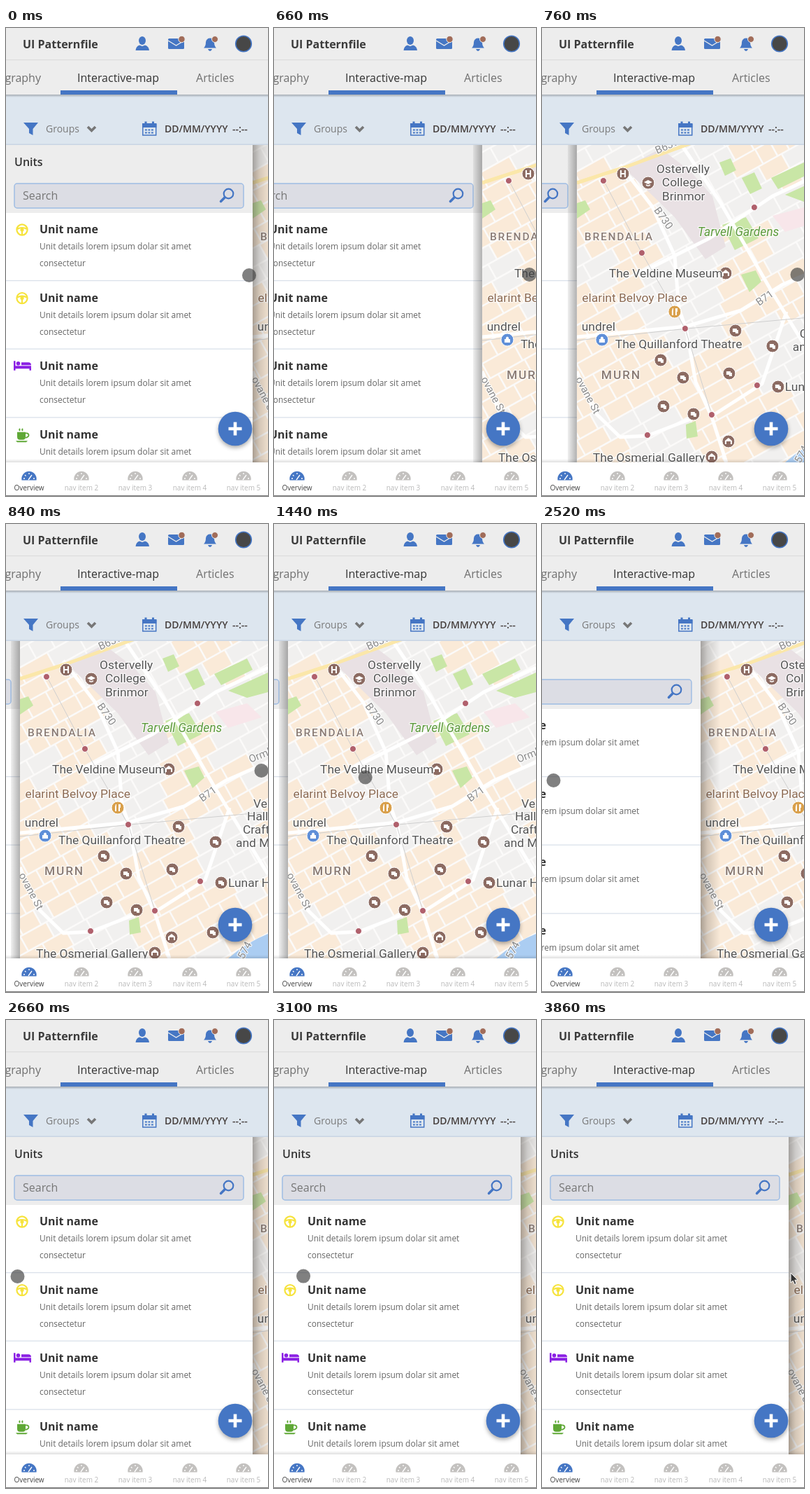
These frames come from a looping animation (375 by 668 pixels, 3.88 s). An HTML page:

```html
<!DOCTYPE html>
<html lang="en">
<head>
<meta charset="utf-8">
<title>Sliding panel over a map</title>
<style>
html, body { margin: 0; width: 100%; height: 100%; overflow: hidden; background: #fff }
svg { display: block; width: 375px; height: 668px; font: 16px "Open Sans", sans-serif; fill: #333 }
.semi { font-weight: 600 }
.bold { font-weight: 700 }
.small { font-size: 12px; fill: #666 }
.nav { font-size: 10px; text-anchor: middle }
.blue { fill: #4576c4 }
.line { fill: none; stroke: #4576c4 }
.map { font: 17.4px Roboto, sans-serif; fill: #555 }
.map text { paint-order: stroke; stroke: #fff; stroke-width: 2.5px; stroke-opacity: .8; stroke-linejoin: round }
.area { font-weight: 500; letter-spacing: 1.8px; fill: #8a7b74 }
.road { font-size: 15px; fill: #8b8b8b }
.street { fill: none; stroke: #fff; stroke-width: 5; stroke-linejoin: round }
.park { fill: #c9e6a6 }
</style>
</head>
<body>
<svg viewBox="0 0 375 668">
  <defs>
    <clipPath id="stage"><path d="M0 167H375V620H0Z"/></clipPath>
    <clipPath id="land"><path d="M20 167H730V620H20Z"/></clipPath>
    <linearGradient id="overMap">
      <stop stop-color="#3a3530" stop-opacity=".42"/>
      <stop offset=".35" stop-color="#3a3530" stop-opacity=".2"/>
      <stop offset="1" stop-color="#3a3530" stop-opacity="0"/>
    </linearGradient>
    <linearGradient id="overPanel">
      <stop stop-color="#444" stop-opacity=".08"/>
      <stop offset="1" stop-color="#444" stop-opacity=".42"/>
    </linearGradient>
    <linearGradient id="down" x2="0" y2="1">
      <stop stop-color="#000" stop-opacity=".25"/>
      <stop offset="1" stop-color="#000" stop-opacity="0"/>
    </linearGradient>
    <filter id="soft" x="-30%" y="-30%" width="160%" height="160%"><feGaussianBlur stdDeviation="3"/></filter>
  </defs>

  <g clip-path="url(#stage)">
    <g id="map" class="map">
      <g clip-path="url(#land)">
        <path fill="#fbfaf9" d="M20 167H400V620H20Z"/>
        <g id="blocks" transform="rotate(-29 200 390)"></g>
        <path fill="#e9e1e4" d="M88 200L140 172 182 204 214 240 233 312 204 330 160 270Z"/>
        <path fill="#f8e6ea" d="M300 268L345 256 366 276 318 291Z"/>
        <g class="park">
          <path d="M228 281L262 270 280 300 246 317Z"/>
          <path d="M224 192L240 186 248 203 232 211Z"/>
          <path d="M256 214L274 206 285 229 268 237Z"/>
          <path d="M298 214L345 192 353 208 308 230Z"/>
          <path d="M318 238L375 212V240L345 248Z"/>
          <path d="M20 250L32 246 39 259 20 272Z"/>
          <path d="M255 352L276 346 284 362 267 377Z"/>
          <path d="M176 566L190 561 193 583 177 586Z"/>
        </g>
        <path fill="#abcdf2" d="M318 620Q346 596 375 585V620Z"/>
        <g class="street">
          <path d="M82 195L128 255 160 325 166 400 177 432 190 505 213 555 234 620"/>
          <path d="M20 441L176 426 255 403 315 366 375 340"/>
          <path d="M170 167L226 250 300 378 375 500"/>
          <path d="M110 350L210 300 300 240 375 205"/>
          <path d="M20 490L45 548 82 584 121 582 186 557"/>
          <path d="M213 554L285 508 320 405"/>
          <path stroke="#fbe7a9" d="M20 221L88 199 190 162"/>
          <path stroke="#cfcfcf" stroke-width="1" d="M20 446L178 429 375 411M58 217L113 321 175 429 213 552"/>
        </g>
        <g id="pins"></g>
        <g>
          <text x="134" y="207">Ostervelly</text>
          <text x="142" y="226">College</text>
          <text x="142" y="246">Brinmor</text>
          <text x="193" y="297" font-style="italic" style="fill:#5c9a3c">Tarvell Gardens</text>
          <text x="66" y="356">The Veldine Museum</text>
          <text x="178" y="391" text-anchor="end" style="fill:#8c6a52">elarint Belvoy Place</text>
          <text x="75" y="432" text-anchor="end">undrel</text>
          <text x="75" y="457">The Quillanford Theatre</text>
          <text x="43" y="619">The Osmerial Gallery</text>
          <text x="318" y="518">Lunar Hall</text>
          <text x="354" y="405">Vel</text>
          <text x="345" y="423">Hall</text>
          <text x="339" y="442">Craft</text>
          <text x="329" y="461">and Mill</text>
          <text class="area" x="31" y="303" font-size="15.5">BRENDALIA</text>
          <text class="area" x="55" y="501">MURN</text>
        </g>
        <g class="road">
          <text transform="translate(130 260) rotate(55)">B730</text>
          <text transform="translate(281 397) rotate(-35)">B71</text>
          <text transform="translate(135 180) rotate(-24)">B639</text>
          <text transform="translate(18 501) rotate(62)">ovane St</text>
          <text transform="translate(350 341) rotate(-22)">Ormley</text>
          <text transform="translate(340 622) rotate(-62)">574</text>
        </g>
      </g>
      <path id="mapShade" fill="url(#overMap)" d="M20 167H48V620H20Z"/>
    </g>

    <g id="panel">
      <path fill="#ededed" d="M0 167H353V264H0Z"/>
      <path fill="#fff" d="M0 264H353V620H0Z"/>
      <text class="semi" x="12" y="197">Units</text>
      <rect x="12" y="222" width="328" height="35" rx="4" fill="#dcdde4" stroke="#9fbde4" stroke-width="1.5"/>
      <text x="24" y="245" fill="#777">Search</text>
      <g class="line" stroke-width="2.2">
        <circle cx="318.500" cy="236.500" r="6.800"/>
        <path stroke-width="3.500" stroke-linecap="round" d="M313 242L307.500 247.500"/>
      </g>
      <g id="rows"></g>
      <path id="panelShade" fill="url(#overPanel)" d="M340 167H353V620H340Z"/>
    </g>
  </g>

  <path fill="#ededed" d="M0 0H375V95H0Z"/>
  <path fill="#dbdbdb" d="M0 45H375V46H0Z"/>
  <path fill="#dde6ef" d="M0 95H375V166H0Z"/>
  <path fill="url(#down)" d="M0 95H375V99H0Z"/>
  <path fill="#c9d5e3" d="M0 165.500H375V167H0Z"/>
  <text class="bold" x="24" y="29" fill="#3b3b3b">UI Patternfile</text>
  <g class="blue">
    <ellipse cx="195" cy="18" rx="5" ry="6"/>
    <path d="M185.500 32Q186 26 191 24.500L195 26 199 24.500Q204.500 26 205 32Z"/>
    <rect x="232" y="15" width="23" height="15" rx="1.500"/>
    <path d="M283 28.500Q286 26 286 20Q287 14.500 292 14.500T298 20Q298 26 301 28.500ZM289 30H295Q294 33 292 33T289 30Z"/>
    <path d="M78 89H245V95H78Z"/>
    <path d="M25 135H46L38.500 144V153L33 150V144Z"/>
    <path d="M195 136H215.500V142H195ZM198.500 133.500H201.500V138H198.500ZM209 133.500H212V138H209Z"/>
  </g>
  <path fill="none" stroke="#ededed" stroke-width="1.400" d="M232 18L243.500 25 255 18"/>
  <path class="line" stroke-width="1.500" d="M195.800 137V153H214.700V137"/>
  <path class="line" stroke-width="2.200" stroke-dasharray="2.800 1.700" d="M199 145.500H212M199 149.500H212"/>
  <g fill="#a16c59" stroke="#ededed"><circle cx="251.500" cy="16" r="4.700"/><circle cx="299" cy="16" r="4.500"/></g>
  <circle cx="340" cy="22.500" r="11.300" fill="#474747" stroke="#4576c4" stroke-width="1.600"/>
  <g fill="#707070">
    <text x="50" y="77" text-anchor="end">Typography</text>
    <text x="102" y="77" fill="#333">Interactive-map</text>
    <text x="272" y="77">Articles</text>
    <text x="57" y="149" font-size="14" fill="#7a7a7a">Groups</text>
  </g>
  <path fill="none" stroke="#777" stroke-width="3.600" d="M117 141L122.500 146.500 128 141"/>
  <text class="semi" x="227" y="149" font-size="14" fill="#463f3d">DD/MM/YYYY<tspan x="324">--:--</tspan></text>

  <circle cx="328" cy="575" r="24" fill="#000" opacity=".35" filter="url(#soft)"/>
  <circle class="blue" cx="328" cy="572" r="24.300"/>
  <path stroke="#fff" stroke-width="4.600" d="M318.500 572H337.500M328 562.500V581.500"/>

  <path fill="url(#down)" opacity=".5" transform="matrix(1 0 0 -1 0 1236)" d="M0 616H375V621H0Z"/>
  <path fill="#fff" d="M0 620H375V668H0Z"/>
  <path fill="#777" d="M0 667H375V668H0Z"/>
  <g id="nav"></g>

  <circle id="touch" r="10" fill="#3c3c3c" fill-opacity=".65"/>
  <path id="arrow" fill="#333" stroke="#fff" d="M0 0V14L3.200 11.200 5.500 16.500 8 15.400 5.800 10.200H10Z"/>
</svg>
<script>
const $ = id => document.getElementById(id);
const LOOP = 3880, TRAVEL = 333;

// City blocks: seeded rows of plots that turn warm in broad patches
let seed = 11;
const rnd = () => (seed = seed * 16807 % 2147483647) / 2147483647;
let plots = '';
for (let y = 70; y < 720; y += 24) {
  for (let x = -80; x < 490;) {
    const w = 16 + rnd() * 36;
    const warmth = Math.sin(x / 38 + 1) * Math.sin(y / 47) + (x < 170 || y > 420 ? .35 : -.2);
    const fill = warmth + rnd() * .8 > .5 ? '#faead8' : '#f1f0ef';
    plots += `<rect x="${x}" y="${y}" width="${w}" height="21.500" fill="${fill}"/>`;
    x += w + 2.5;
  }
}
$('blocks').innerHTML = plots;

// Map markers
const stations = [[58, 218], [274, 256], [113, 321], [175, 429], [278, 510], [213, 552], [121, 581]];
const places = [[86, 208], [122, 221], [233, 350], [247, 432], [140, 474], [172, 499], [238, 493],
  [144, 540], [187, 551], [300, 454], [308, 512], [213, 612], [237, 590], [296, 583]];
const pin = ([x, y], color = '#8c6b62', glyph = 'M-4-3H2V2H-4ZM0-1H4V4H0Z') =>
  `<g transform="translate(${x} ${y})"><circle r="9" fill="${color}" stroke="#fff"/><path fill="#fff" d="${glyph}"/></g>`;
const letter = 'M-4-5H-2V-1H2V-5H4V5H2V1H-2V5H-4Z';
const cap = 'M-6-1L0-4 6-1 0 2ZM-3 2L0 3.500 3 2V4L0 5-3 4Z';
const hall = 'M-5-1L0-5 5-1V4H3V0H-3V4H-5Z';
const fork = 'M-3-5H-2V5H-4V-1ZM1-5H4V0H3V5H1Z';
const lock = 'M-4-1H-2V-3Q0-6 2-3V-1H4V4H-4Z';
const glyphs = { 0: letter, 1: cap, 2: hall, 11: hall, 12: hall };
$('pins').innerHTML =
  stations.map(([x, y]) => `<circle cx="${x}" cy="${y}" r="4.500" fill="#b0606c" stroke="#fff"/>`).join('') +
  places.map((p, i) => pin(p, undefined, glyphs[i])).join('') +
  pin([160, 405], '#d9a04c', fork) + pin([56, 445], '#5f8fd8', lock);

// List rows
const wheel = `<g fill="none" stroke="#f6e33c" stroke-width="2.200"><circle cx="23" cy="24" r="7.600"/>
  <path d="M16 23Q23 19 30 23M23 25V31"/></g><circle cx="23" cy="24" r="2.600" fill="#f6e33c"/>`;
const bed = `<path fill="#8b20e4" d="M11 16H13.500V23H36V29.500H33.500V27H13.500V29.500H11ZM22 18H32Q36 18 36 22H22Z"/>
  <circle cx="17.500" cy="19.500" r="2.800" fill="#8b20e4"/>`;
const cup = `<path fill="#5fa836" d="M16 20H28V27Q28 31 24 31H20Q16 31 16 27ZM14 32.500H31L29 34.500H16Z"/>
  <path fill="none" stroke="#5fa836" stroke-width="1.800" d="M28 21.500H30Q32.500 22 32.500 24.500T28 28M20 18Q18.500 16.500 20 15M24 18Q22.500 16.500 24 15"/>`;
$('rows').innerHTML = [wheel, wheel, bed, cup].map((icon, i) => `
  <g transform="translate(0 ${264 + i * 97.6})">${icon}
    <text class="bold" x="48" y="29">Unit name</text>
    <text class="small" x="48" y="52">Unit details lorem ipsum dolar sit amet</text>
    <text class="small" x="48" y="76">consectetur</text>
    <path fill="#d9e0ea" d="M0 96H353V97.200H0Z"/>
  </g>`).join('');

// Bottom navigation
$('nav').innerHTML = [33, 108, 185, 263, 340].map((x, i) => `
  <g transform="translate(${x} 645)">
    <path fill="${i ? '#c3c1bf' : '#4576c4'}" d="M-10.500 0A10.700 10.700 0 1 1 10.500 0Z" transform="translate(0 .5)"/>
    <path fill="none" stroke="#fff" stroke-width="1.300" d="M-1 0L4-7M-8-2H-6M-6-7L-4.500-5.500M0-10V-8M8-2H6"/>
    <text class="nav" y="15" fill="${i ? '#b9b9b9' : '#444'}">${i ? 'nav item ' + (i + 1) : 'Overview'}</text>
  </g>`).join('');

const clamp = p => Math.max(0, Math.min(1, p));
const smooth = p => p * p * (3 - 2 * p);

// The standard CSS "ease" curve
function ease(p) {
  const curve = (a, b, s) => 3 * (1 - s) ** 2 * s * a + 3 * (1 - s) * s * s * b + s ** 3;
  let lo = 0, hi = 1;
  for (let i = 0; i < 24; i++) {
    const mid = (lo + hi) / 2;
    if (curve(.25, .25, mid) < p) lo = mid; else hi = mid;
  }
  return curve(.1, 1, lo);
}
const CLOSE = 633, OPEN = 2449;
const slide = (t, start) => ease(clamp((t - start) / 200));

// Pointer legs: start, end, x, y
const legs = [[60, 420, 365.5, 352], [1120, 1640, 16.5, 366], [2980, 3700, 356, 361]];
function pointer(t) {
  let x = 348, y = 353;
  for (const [from, to, toX, toY] of legs) {
    const p = smooth(clamp((t - from) / (to - from)));
    x += (toX - x) * p;
    y += (toY - y) * p;
  }
  return [x, y];
}

const move = (id, x, y = 0) => $(id).setAttribute('transform', `translate(${x} ${y})`);
const show = (id, on) => $(id).setAttribute('visibility', on ? 'visible' : 'hidden');

function draw(now) {
  const t = now % LOOP;
  const closed = slide(t, CLOSE) - slide(t, OPEN);
  const isClosed = t >= CLOSE && t < OPEN;
  move('panel', -TRAVEL * closed);
  move('map', TRAVEL * (1 - closed));
  show('mapShade', !isClosed);
  show('panelShade', isClosed);
  const [x, y] = pointer(t);
  move('touch', x, y);
  move('arrow', x, y);
  show('touch', t < 3780);
  show('arrow', t >= 3780);
}

const begin = performance.now();
function tick() {
  draw(performance.now() - begin);
  requestAnimationFrame(tick);
}
tick();
</script>
</body>
</html>
```
